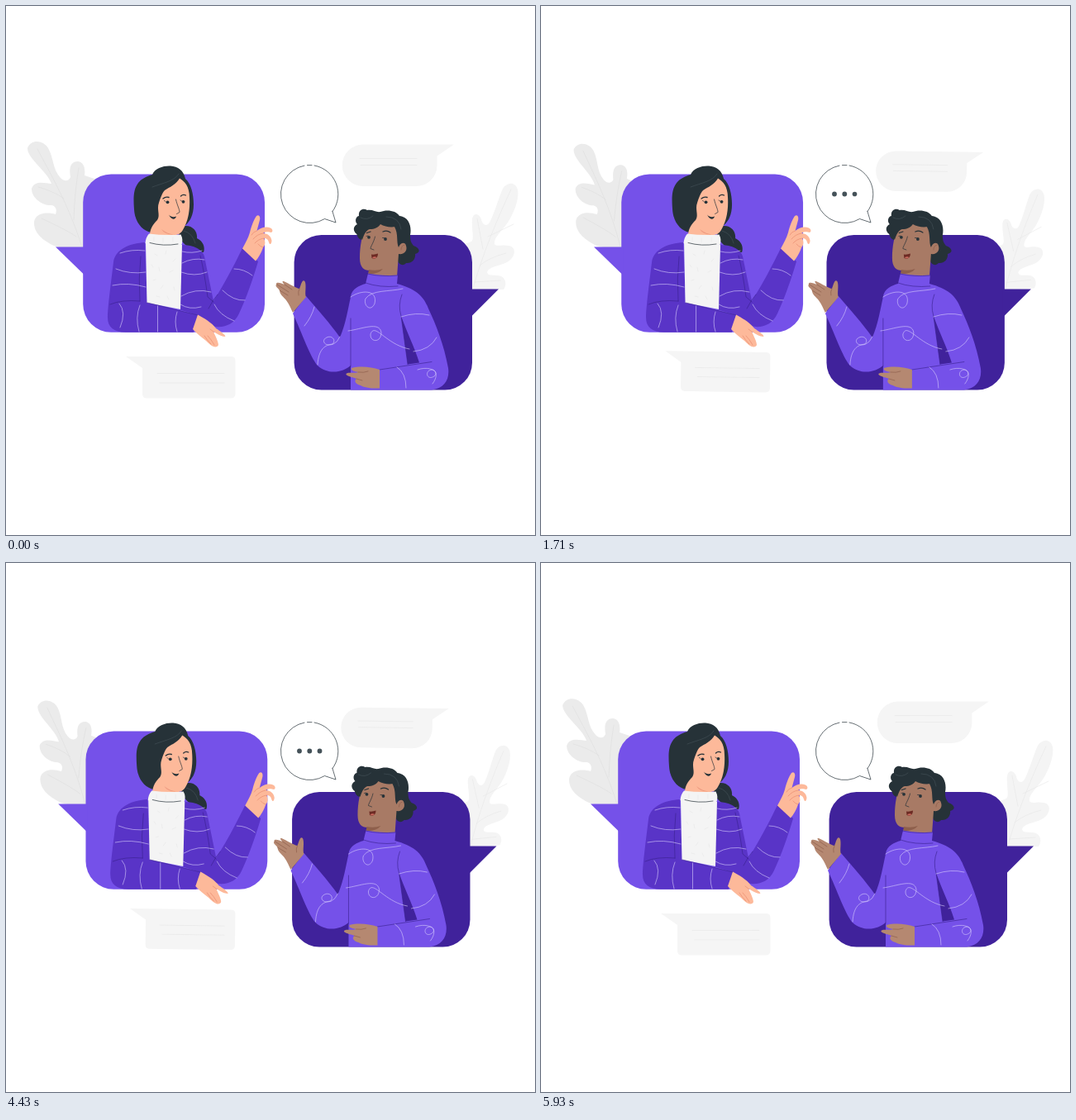
These frames come from a looping animation (640x640 px, 6 s). An HTML page:

```html
<!DOCTYPE html>
<html lang="en">
<head>
<meta charset="utf-8">
<title>Conversation</title>
<style>
html, body { margin: 0; width: 100%; height: 100%; overflow: hidden; background: #fff; }
svg { display: block; width: 100%; height: 100%; }
path, circle { stroke-linecap: round; stroke-linejoin: round; }
.line { fill: none; stroke-width: .7; }
.ink { stroke: #263238; }
.brow { stroke-width: 1.3; }
.thread { stroke: #d9cffb; stroke-width: .6; }
.seam { stroke: #38208c; stroke-width: .6; }
.vein { stroke: #dedede; stroke-width: .6; }
.pale { stroke: #e6e6e6; stroke-width: .6; }
.curl { stroke: #46535a; stroke-width: .6; }
.fold { stroke: #e88d72; }
.crease { stroke: #8e5f4c; }
.dark { fill: #263238; }
.violet { fill: #7551e9; }
.jacket { fill: #5934c7; }
.night { fill: #40229b; }
.peach { fill: #fdb99a; }
.brown { fill: #b58871; }
.face { fill: #a87a65; }
.wool { fill: #f4f4f4; }
</style>
</head>
<body>
<svg viewBox="0 0 640 640">
  <g id="leafL">
    <path fill="#ebebeb" d="M110 300L62 291.5C48 286 33 276 34 261C36 250 50 249 60 252C62 246 60 242 55 241C45 242 31 233 31 221C35 210 48 215 55 215C50 200 26 185 26 172C30 161 45 162 51 172C58 184 56 197 66 208C71 213 76 212 78 207C76 196 78 188 87 188C95 189 96 198 95 205L110 210Z"/>
    <path class="line vein" d="M38 173C52 200 76 240 92 292M39 219C50 222 62 227 70 233M43 257C58 264 75 272 85 279M88 196Q83 225 82 259"/>
  </g>
  <g id="leafR">
    <path fill="#f4f4f4" d="M550 343H602C607 336 604 326 594 326C588 325 583 327 582 322C584 315 596 315 606 310C617 304 618 291 608 290C600 288 594 292 591 288C590 280 600 272 607 262C616 248 621 232 619 222C616 212 606 213 601 221C596 232 592 248 585 262C581 268 576 264 575 258C572 250 565 250 564 258C563 270 567 282 563 285L550 290Z"/>
    <path class="line pale" d="M611 222C598 250 580 290 565 341M614 264L583 279M605 299Q585 304 573 314M598 332L567 334M570 257L577 294"/>
  </g>
  <g id="noteTop">
    <path fill="#f5f5f5" d="M432 167.5H542L521.5 181.5V193A25 25 0 0 1 496 218H432A25.2 25.2 0 0 1 432 167.5Z"/>
    <path class="line pale" d="M428 184.5H497M429 192.5H497"/>
  </g>
  <g id="noteLow">
    <path fill="#f5f5f5" d="M145 424H272Q277.5 424 277.5 429V469Q277.5 474.5 272 474.5H170Q165 474.5 165 469V438Z"/>
    <path class="line pale" d="M183 444.5H264M186 456H264"/>
  </g>

  <g id="woman">
    <rect class="violet" x="93.2" y="203.5" width="219.8" height="191.3" rx="34"/>
    <path class="violet" d="M60 291.5H95V325.5Z"/>
    <path class="dark" d="M177 204C180 196 191 193 199 193.5C208 194 215 199 217 209C224 215 227 228 227 240C227 252 223 261 216 266C226 265 232 273 231 281C239 285 241 292 239 298C228 297 213 291 209 276L176 274C165 272 156 262 155 246C154 232 154 222 160 214C164 209 170 206 177 204Z"/>
    <path class="line curl" d="M177 219C190 214 204 212 209 203M215 272Q226 275 229 287"/>
    <path class="peach" d="M210 208.500C216 212 222 218 222 232C223 250 219 262 215 269C212 276 207 277 204 277L208 282H174C173 270 178 264 183 259C187 253 182 246 185 238C187 232 189 226 192 223C198 219 206 216 210 208.500Z"/>
    <path fill="#ee9c82" d="M188 270C195 275 200 277 205 276Q193 278 188 270Z"/>
    <circle class="dark" cx="195.500" cy="237.300" r="1.900"/>
    <circle class="dark" cx="214.500" cy="236.800" r="1.900"/>
    <path class="line ink" d="M193 236.500L191.500 235.500M212.500 236L211 235M205.500 234C207 241 210 246 210 249.500L206.500 251.500"/>
    <path class="line ink brow" d="M190 233Q193 230.500 197 231.500M211.500 230Q214 227.500 217.500 229"/>
    <path class="dark" d="M197 252.500C199 255 203 256 206 254.500C205 259 200 259 197 252.500Z"/>

    <path class="jacket" d="M168 286C150 287 132 294 130 310C127 335 123 365 123 377C123 388 130 394.800 145 394.800H227L232 374L171 359Z"/>
    <path class="jacket" d="M212 289C228 289 238 295 240 303L251 357C260 343 274 318 286 293L305 309C299 330 290 355 282 372C275 388 258 391 247 386L232 374L209 367Z"/>
    <path class="wool" d="M169 286L213 289L211 367L170.500 359Z"/>
    <path class="wool" d="M173 275.500Q192 278 211.500 276.500Q215 283 212 290Q188 293 168.500 287Q169 280 173 275.500Z"/>
    <path class="line ink" d="M174 286.500Q190 291 208 288"/>
    <path class="line pale" d="M180 300l3 2M194 296l-1 4M205 306l-3 3M185 316l1 5M198 322l4-2M178 332l3-1M190 338l-3 4M203 340l1 4M182 351l4 1M197 355l-2-4M176 313l2 3M179 280v4M190 281v5M202 280v5"/>
    <path class="line seam" d="M163 303Q160 330 162 357M171 359L232 374M235 302Q240 322 244 352L251 358M126 361Q140 355 162 357M245 366Q250 356 256 349"/>
    <path class="line thread" d="M138 299Q152 294 168 296M133 318Q150 325 169 322M129 338Q148 334 169 340M137 360Q146 370 138 389M162 362Q156 377 161 394M183.500 363V394"/>
    <path class="line thread" d="M207 370Q203 382 207 394M213 297Q225 300 237 296M213 311Q226 304 240 307M212 322Q228 328 243 322M212 351Q229 341 248 346M211 361Q222 368 236 364M276 318Q288 318 298 326M262 344Q275 357 289 356M252 361Q258 374 276 381"/>
    <path class="peach" d="M286 293.500C290 286 293 281 295 274C297 266 300 258 303 254C306 251.500 308 255 307 259L303.500 272C308 268 315 266 320 268.500C323 270 323 273 321 274C318 274 316 272 311 275C317 275 321 279 321.500 284C321 289 319 289 318 286C317 282 315 281 312 281C314 285 314 289 311 292C309 299 305 305 302 308.500Z"/>
    <path class="line fold" d="M303.500 272Q299 273 297 277M311 275Q304 276 299 282M312 281Q305 282 301 287M311 292Q307 291 305 288"/>
    <path class="peach" d="M232 373.500C240 378 249 383 254 390C260 394 267 399 265 400C261 400 256 397 251 394C254 401 259 410 256 411.500C252 415 246 409 242 405C236 400 230 396 226 391Z"/>
    <path class="line fold" d="M251 394L247 391M252 410Q248 403 244 399M248 409Q243 404 240 399"/>
  </g>

  <g id="man">
    <rect class="night" x="348.600" y="277" width="215.400" height="187.500" rx="33"/>
    <path class="night" d="M596 342.500H562V376.500Z"/>
    <path class="dark" d="M430 283C424 281 426 276 423 275C419 270 421 266 425 264C421 260 424 254 427 254C426 247 432 244 437 247C444 246 448 250 453 249C460 246 472 247 476 254C488 255 491 268 489 277C489 284 490 286 493 290C501 293 502 298 495 300C496 306 491 312 484 311C481 315 475 313 474 308L450 270Z"/>
    <path class="face" d="M434 268C431 278 428 290 428 305C428 316 433 320 440 320L438 325L473 328L475 300C482 301 486 296 484 290C483 285 477 286 475 292C472 286 475 276 470 267C462 262 445 263 434 268Z"/>
    <path class="dark" d="M426 264C427 272 428 278 431 283C433 276 436 271 440 270C446 270 450 268 453 264C458 267 465 268 471 267L474 258L450 251L432 254Z"/>
    <path class="line curl" d="M429 256Q437 260 444 254M460 255Q476 255 478 270"/>
    <path fill="#8e5f4c" d="M439 319Q448 321 456 318Q450 325 438 324Z"/>
    <path class="line crease" d="M478 295Q478 290 482 289"/>
    <circle class="dark" cx="439" cy="279.800" r="1.900"/>
    <circle class="dark" cx="459" cy="282" r="1.900"/>
    <path class="line ink" d="M436 278.500L438 278M455.500 280.500L457.500 280.500M446.500 279C445 286 441 291 441 293.500L445 295"/>
    <path class="line ink brow" d="M456 273Q461 271 465 274M436.500 274.500L441 273"/>
    <path fill="#6d2b24" d="M442 300.500Q446 301 450 299.500C450 305 446 307 442.500 305Z"/>
    <path fill="#c9695e" d="M443 304.500Q446 302.500 448.500 304Q446 306.500 443 304.500Z"/>

    <path class="violet" d="M438 323.500Q455 327 474 325.500L473 336C495 342 505 350 511 366C520 385 530 410 535 438C537 452 530 463 515 464.500H417V435C408 443 390 447 377 435C368 425 358 395 347 372L363 351C375 365 393 385 404 401C411 385 414 365 417 352C418 342 428 338 435 336Z"/>
    <path class="night" d="M478 375L486 433.500L500 431.500C494 412 485 395 478 375Z"/>
    <path class="line seam" d="M437 324Q455 328 474 326M435 335Q452 341 474 339M417 378V436M479 349Q474 362 478 375L486 433.500M452 440L515 430.500"/>
    <path class="line thread" d="M417 352C430 343 450 343 446 360C441 371 432 362 435 354C443 343 463 346 480 342M414 393C430 391 452 381 454 395C454 408 440 407 441 397C446 382 460 410 488 415"/>
    <path class="line thread" d="M377 434C378 415 386 410 395 409C400 404 394 398 388 401C381 404 385 413 396 409Q401 407 404 400M361 387Q370 376 373 364M478 376Q496 370 512 374M493 418Q513 416 521 401M473 437Q484 444 484 462M498 440C512 435 525 442 518 448C510 453 507 444 512 441C520 437 524 447 516 457"/>
    <path class="brown" d="M452 440C442 437 430 435 418 438C417 441 421 442 426 443C420 445 411 442 411.500 446C415 449 420 449 424 451C420 454 424 458 429 459C434 462 445 463 452 462.500Z"/>
    <path class="line crease" d="M426 443Q433 444 438 442M424 451L431 453"/>
    <path class="brown" d="M363 352C361 348 364 338 361.500 333C358 330 357 338 355 342C350 341 343 336 336 333C333 333 335 335 337 337C333 335 326 333 327 337C325 339 329 341 331 344C331 349 336 352 339 356C343 361 345 367 347 371Z"/>
    <path class="line crease" d="M337 337L346 343M328 337L342 346M331 344L341 350M355 342Q353 346 354 350"/>
  </g>

  <path class="line ink" d="M395 248.500A35 35 0 0 0 373 193M364.500 192.600H370M361 193.100A35 35 0 1 0 385.500 257.500L399 262L395 248.500"/>
  <g id="dots" fill="#455259">
    <circle cx="355" cy="227.500"/>
    <circle cx="367.300" cy="227.500"/>
    <circle cx="379.500" cy="227.500"/>
  </g>
</svg>
<script>
const LOOP = 6000;
const $ = id => document.getElementById(id);
const dots = [...$('dots').children];

// [time, progress] keys joined by smooth cubic segments
const slide = [[0, 0], [570, .4], [1710, .92], [3000, 1], [4000, .9], [4790, .57], [5900, .01], [6000, 0]];
const sway = [[0, 0], [570, .18], [1710, .82], [3000, 1], [4000, .88], [4790, .59], [5900, .02], [6000, 0]];

function progress(keys, t) {
  const i = Math.max(0, keys.findIndex(k => k[0] > t) - 1);
  const slope = j => j < 1 || j > keys.length - 2 ? 0
    : (keys[j + 1][1] - keys[j - 1][1]) / (keys[j + 1][0] - keys[j - 1][0]);
  const [t0, a] = keys[i], [t1, b] = keys[i + 1];
  const d = t1 - t0, u = (t - t0) / d, v = 1 - u;
  return a * v * v * (1 + 2 * u) + b * u * u * (3 - 2 * u)
    + d * u * v * (slope(i) * v - slope(i + 1) * u);
}

// Pivot, shift, turn and shrink at full progress
const floaters = [
  ['leafL', 95, 300, 4.4, 0, 4, .05],
  ['leafR', 563, 340, -3.4, 0, -2.6, .08],
  ['noteTop', 407, 193, -2, 8, 1, .05],
  ['noteLow', 277.5, 424, 0, -6, 1, .05]
];

function draw() {
  const t = performance.now() % LOOP;
  const s = progress(slide, t), p = progress(sway, t);
  const move = (id, x) => $(id).setAttribute('transform', `translate(${x})`);
  move('woman', 4.4 * s);
  move('man', -3.4 * s);
  for (const [id, x, y, dx, dy, turn, shrink] of floaters)
    $(id).setAttribute('transform',
      `translate(${x + dx * p} ${y + dy * p}) rotate(${turn * p}) scale(${1 - shrink * p}) translate(${-x} ${-y})`);

  const half = 1500 - Math.abs(t % 3000 - 1500);
  dots.forEach((dot, k) => {
    const start = 70 + 90 * k;
    const u = Math.max(0, (half - start) / (1500 - start));
    dot.setAttribute('r', 2.9 * (1 - (1 - u) ** (4 - k)));
  });
  requestAnimationFrame(draw);
}
draw();
</script>
</body>
</html>
```
